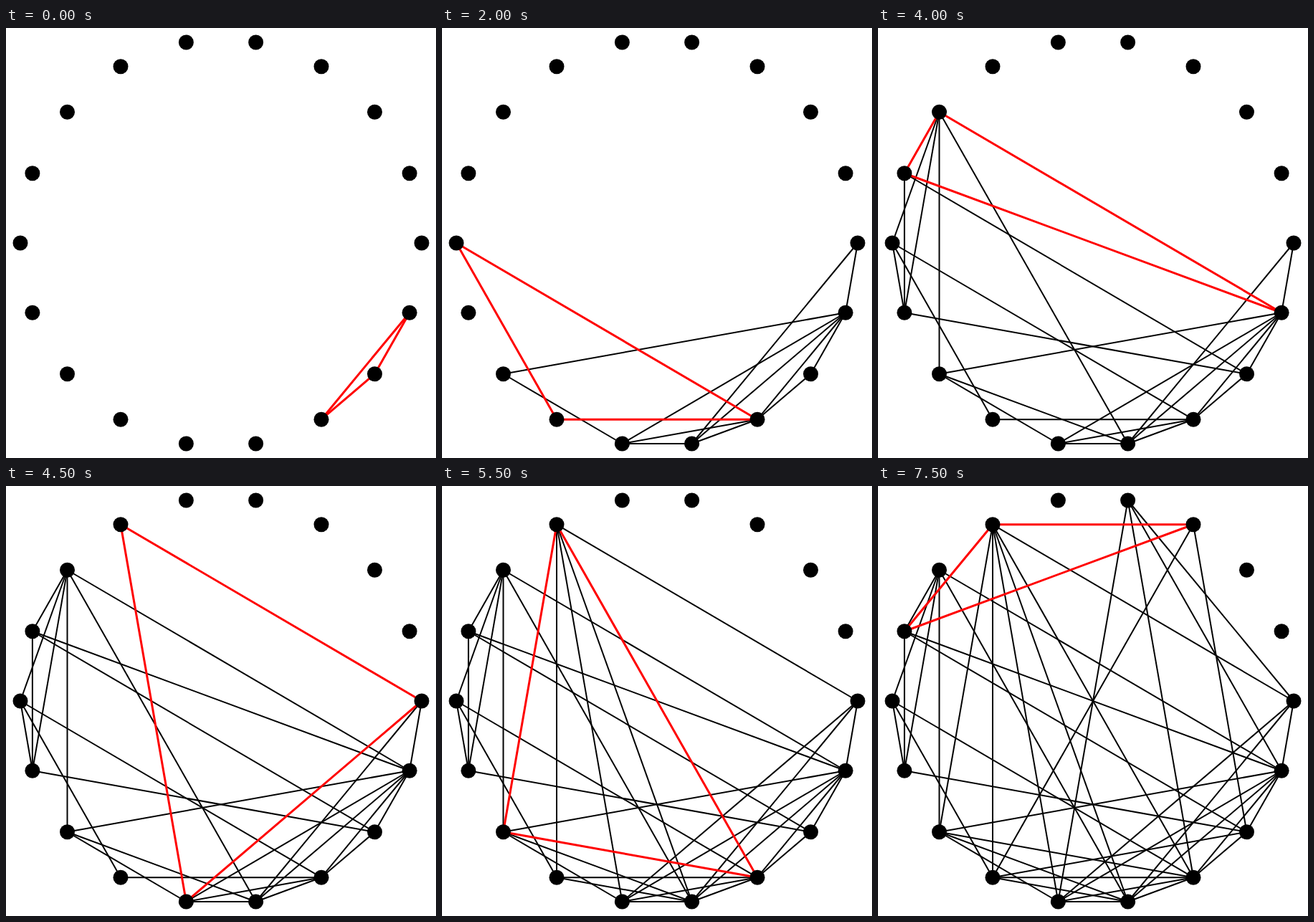
Recreate the animation shown at these times as an HTML page. Size 600x600 px, loop 8000 ms.

```html
<!DOCTYPE html>
<html lang="en">
<head>
<meta charset="utf-8">
<title>Triangles on a ring</title>
<style>
  html, body { margin: 0; width: 100%; height: 100%; overflow: hidden; background: #fff; }
  svg { display: block; width: 100vw; height: 100vh; }
</style>
</head>
<body>
<svg viewBox="0 0 600 600">
  <g id="edges" fill="none"></g>
  <g id="dots"></g>
</svg>
<script>
const STEP = 500;
const COUNT = 18;
const CENTER = 300;
const REACH = 280;

// Each apex in turn closes a triangle over pairs of earlier points.
const basesByApex = {
  3: [[1, 2]],
  4: [[0, 1]],
  5: [[3, 4]],
  7: [[1, 5]],
  9: [[3, 6]],
  10: [[2, 8]],
  11: [[4, 7], [8, 9], [1, 10]],
  12: [[0, 5], [4, 6], [3, 7]],
  14: [[0, 1], [3, 5]],
  15: [[2, 6], [10, 12]]
};
const triangles = Object.entries(basesByApex).flatMap(([apex, bases]) =>
  bases.map(base => [...base, Number(apex)]));

// The ring is scaled so that its outermost points reach equally far both ways.
const angles = Array.from({ length: COUNT }, (_, i) => 2 * Math.PI * i / COUNT);
const radius = trig => REACH / Math.max(...angles.map(trig));
const rx = radius(Math.cos), ry = radius(Math.sin);
const points = angles.map(a => [CENTER + rx * Math.cos(a), CENTER + ry * Math.sin(a)]);

function add(parent, tag, attrs) {
  const node = document.createElementNS("http://www.w3.org/2000/svg", tag);
  for (const key in attrs) node.setAttribute(key, attrs[key]);
  return document.getElementById(parent).appendChild(node);
}

// A shared edge keeps the step of the first triangle that uses it.
const firstUse = new Map();
triangles.forEach(([a, b, c], step) => {
  for (const pair of [[a, b], [b, c], [a, c]]) {
    const key = pair.join();
    if (!firstUse.has(key)) firstUse.set(key, { pair, step });
  }
});

const edges = [...firstUse.values()].map(({ pair: [a, b], step }) => {
  const [x1, y1] = points[a], [x2, y2] = points[b];
  return { step, line: add("edges", "line", { x1, y1, x2, y2 }) };
});

for (const [cx, cy] of points) add("dots", "circle", { cx, cy, r: 10.5 });

let shown = -1;
function draw(time) {
  const now = Math.floor(time / STEP) % triangles.length;
  if (now === shown) return;
  shown = now;
  for (const { step, line } of edges) {
    const fresh = step === now;
    line.setAttribute("visibility", step <= now ? "visible" : "hidden");
    line.setAttribute("stroke", fresh ? "#f00" : "#000");
    line.setAttribute("stroke-width", fresh ? 3 : 2);
  }
}

const start = performance.now();
function tick() {
  draw(performance.now() - start);
  requestAnimationFrame(tick);
}
tick();
</script>
</body>
</html>
```
